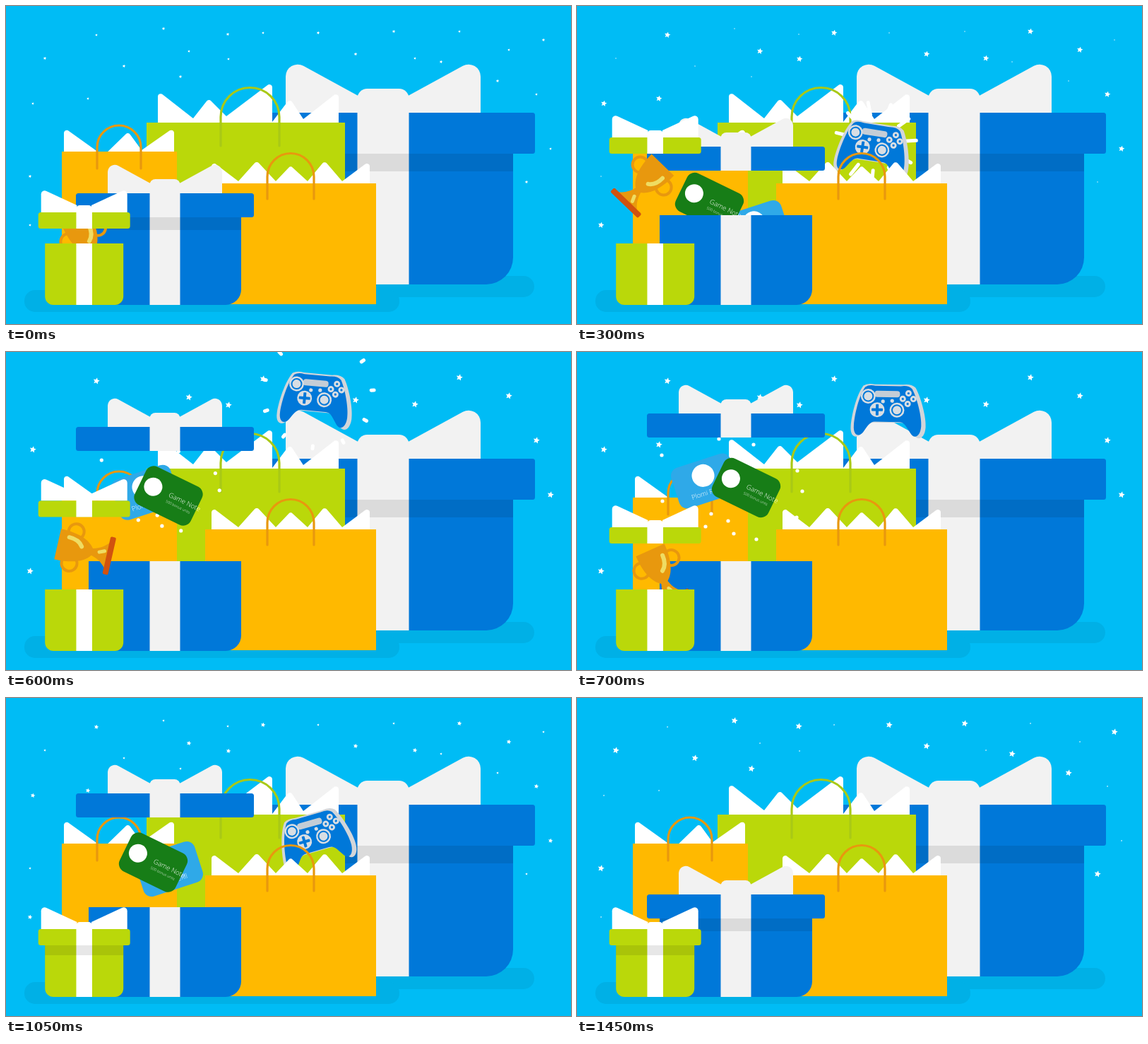
Write an HTML page with a canvas that moves like this. It is 800 px wide and 450 px high and loops after 2950 ms.

```html
<!DOCTYPE html>
<html lang="en">
<head>
<meta charset="utf-8">
<title>Gifts</title>
<style>
html, body { margin: 0; width: 100%; height: 100%; overflow: hidden; background: #00bcf5; }
canvas { display: block; width: 800px; height: 450px; }
</style>
</head>
<body>
<canvas id="stage" width="800" height="450"></canvas>
<script>
const ctx = document.getElementById('stage').getContext('2d');
const LOOP = 2950, END = 1450, STEP = 50;
const SKY = '#00bcf5', BLUE = '#0078d9', LIME = '#bad80a', ORANGE = '#ffb900',
      GOLD = '#e8980e', PAPER = '#f2f2f2', WHITE = '#fff', FONT = '"Open Sans", sans-serif';

// Smooth monotone interpolation through rows of [time, ...values].
function track(rows, t) {
  const last = rows.length - 1;
  if (t <= rows[0][0]) return rows[0].slice(1);
  if (t >= rows[last][0]) return rows[last].slice(1);
  let i = 0;
  while (rows[i + 1][0] <= t) i++;
  const h = rows[i + 1][0] - rows[i][0], u = (t - rows[i][0]) / h;
  return rows[i].slice(1).map((a, k) => {
    const c = k + 1;
    const rate = j => (rows[j + 1][c] - rows[j][c]) / (rows[j + 1][0] - rows[j][0]);
    const slope = j => {
      if (j === 0) return rate(0);
      if (j === last) return rate(last - 1);
      const p = rate(j - 1), q = rate(j);
      return p * q <= 0 ? 0 : 2 * p * q / (p + q);
    };
    const b = rows[i + 1][c], v = 1 - u;
    return a * (1 + 2 * u) * v * v + b * u * u * (3 - 2 * u) +
      h * (slope(i) * u * v * v - slope(i + 1) * u * u * v);
  });
}

const MOTION = {
  lid: [[0, 265], [300, 199], [450, 151], [700, 87], [790, 82], [1050, 135], [1300, 227], [1450, 278]],
  cap: [[0, 292], [300, 186], [400, 172], [450, 174], [700, 248], [870, 327]],
  cup: [[0, 116, 338, -25], [300, 95, 252, 44], [450, 94, 249, 166], [700, 119, 315, 336], [870, 116, 385, 370]],
  pad: [[0, 402, 310, 4], [300, 420, 202, 9], [450, 433, 89, 10], [580, 438, 66, 6], [700, 441, 82, 1],
        [1050, 438, 199, -16], [1300, 437, 265, -24], [1450, 436, 310, -28]],
  green: [[0, 170, 350], [300, 187.5, 278], [450, 208.5, 232.5], [700, 239.5, 192], [750, 241, 190],
          [1050, 208.5, 232.5], [1300, 180, 304], [1450, 170, 350]],
  blue: [[0, 270, 370], [300, 253, 314], [450, 231, 242], [700, 181, 182.5], [750, 179, 180],
         [1050, 231, 242], [1300, 258, 340], [1450, 270, 370]],
  starA: [[0, .4], [300, .92], [450, 1], [700, 1], [1050, .72], [1300, .38], [1450, .25]],
  starB: [[0, .5], [300, .2], [450, 0], [700, 0], [1050, .38], [1300, .8], [1450, 1]]
};

const STARS_A = [[128, 41], [259, 64], [315, 75], [364, 38], [495, 68], [579, 74], [642, 36],
  [712, 62], [751, 125], [771, 202], [116, 131], [38, 138], [34, 310]];
const STARS_B = [[55, 74], [167, 85], [223, 32], [247, 100], [314, 40], [442, 38], [495, 68],
  [549, 36], [616, 79], [696, 106], [761, 48], [737, 249], [34, 241]];
const CONFETTI = [[-95, -44], [35, -59], [97, -22], [104, 7], [96, 44], [39, 75], [7, 67],
  [-33, 57], [-94, 21], [-25, 39], [-1, 49], [-14, -67], [-32, 9]];

const BIG = { x: 534, lidW: 430, lidH: 58, boxW: 368, boxTop: 180, bottom: 394, boxR: 38, rib: 73, bow: 276,
  join: 24, corner: 80, tipR: 17, knot: 34, knotR: 14, shade: 25, fill: BLUE, ribbon: PAPER };
const MID = { x: 225, lidW: 252, lidH: 34, boxW: 216, boxTop: 296, bottom: 423, boxR: 22, rib: 43, bow: 162,
  join: 14, corner: 47, tipR: 10, knot: 20, knotR: 8, shade: 18, fill: BLUE, ribbon: PAPER };
const TINY = { x: 110.7, lidW: 130, lidH: 23, boxW: 111, boxTop: 336, bottom: 423, boxR: 12, rib: 22.5, bow: 122,
  join: 10, corner: 33.5, tipR: 5, knot: 10, knotR: 5, shade: 14, fill: LIME, ribbon: WHITE };

const PAD = new Path2D('M-36-34Q-30-38-20-36L20-36Q32-38 38-32C46-18 54 10 53 24C52 40 42 44 36 34' +
  'C28 22 26 18 18 18L-20 18C-28 18-32 26-38 34C-44 42-54 40-53 24C-52 8-46-20-36-34Z');
const CUP = new Path2D('M-22-38L22-38C22-12 16 4 5 12C8 24 14 30 20 35L-20 35C-14 30-8 24-5 12C-16 4-22-12-22-38Z');

function box(x, y, w, h, r, fill) {
  ctx.fillStyle = fill;
  ctx.beginPath();
  ctx.roundRect(x, y, w, h, r);
  ctx.fill();
}

function disc(x, y, r, fill) {
  ctx.fillStyle = fill;
  ctx.beginPath();
  ctx.arc(x, y, r, 0, Math.PI * 2);
  ctx.fill();
}

function line(x1, y1, x2, y2) {
  ctx.beginPath();
  ctx.moveTo(x1, y1);
  ctx.lineTo(x2, y2);
  ctx.stroke();
}

function pen(color, width) {
  ctx.strokeStyle = color;
  ctx.lineWidth = width;
  ctx.lineCap = 'round';
}

function at(x, y, deg, draw) {
  ctx.save();
  ctx.translate(x, y);
  ctx.rotate(deg * Math.PI / 180);
  draw();
  ctx.restore();
}

function star(x, y, size) {
  if (size < .05) return;
  ctx.fillStyle = WHITE;
  ctx.beginPath();
  for (let i = 0; i < 10; i++) {
    const r = size * (i % 2 ? 2.3 : 4.8), a = i * Math.PI / 5 - 1.35;
    ctx.lineTo(x + r * Math.cos(a), y + r * Math.sin(a));
  }
  ctx.fill();
}

// Points alternate between rounded tips and sharp valleys.
function tissue(points, base) {
  const first = points[0], end = points[points.length - 1];
  ctx.fillStyle = WHITE;
  ctx.beginPath();
  ctx.moveTo(first[0], base);
  points.forEach((p, i) => {
    const next = points[i + 1] || [end[0], base];
    if (i % 2) ctx.lineTo(p[0], p[1]);
    else ctx.arcTo(p[0], p[1], next[0], next[1], 4);
  });
  ctx.lineTo(end[0], base);
  ctx.fill();
}

function bag(x, y, w, bottom, fill, points, handle) {
  tissue(points, y + 1);
  box(x, y, w, bottom - y, 0, fill);
  const [hx, hy, r, foot, color] = handle;
  pen(color, 3.2);
  ctx.beginPath();
  ctx.moveTo(hx - r, foot);
  ctx.arc(hx, hy, r, Math.PI, 0);
  ctx.lineTo(hx + r, foot);
  ctx.stroke();
}

function lobe(g, y, side) {
  const outer = g.x + side * g.bow / 2, inner = g.x + side * (g.rib / 2 - 1);
  ctx.fillStyle = g.ribbon;
  ctx.beginPath();
  ctx.moveTo(outer, y);
  ctx.arcTo(outer, y - g.corner, inner, y - g.join, g.tipR);
  ctx.lineTo(inner, y - g.join);
  ctx.lineTo(inner, y);
  ctx.fill();
}

function gift(g, y) {
  const left = g.x - g.boxW / 2, rib = g.x - g.rib / 2, under = y + g.lidH;
  box(left, g.boxTop, g.boxW, g.bottom - g.boxTop, [0, 0, g.boxR, g.boxR], g.fill);
  box(rib, g.boxTop, g.rib, g.bottom - g.boxTop, 0, g.ribbon);
  const top = Math.max(under, g.boxTop);
  if (under + g.shade > top) box(left, top, g.boxW, under + g.shade - top, 0, 'rgba(0,0,0,.095)');
  lobe(g, y, -1);
  lobe(g, y, 1);
  box(g.x - g.lidW / 2, y, g.lidW, g.lidH, 3.5, g.fill);
  box(rib, y - g.knot, g.rib, g.knot + g.lidH, [g.knotR, g.knotR, 0, 0], g.ribbon);
}

function rays(x, y, count, start, inner, outer, width) {
  if (outer <= inner) return;
  pen(WHITE, width);
  for (let i = 0; i < count; i++) {
    const a = start + i * Math.PI * 2 / count, c = Math.cos(a), s = Math.sin(a);
    line(x + c * inner, y + s * inner, x + c * outer, y + s * outer);
  }
}

function ring(x, y) {
  disc(x, y, 10.5, '#d9dee3');
  disc(x, y, 8, BLUE);
  disc(x, y, 6, '#d9dee3');
}

function controller() {
  ctx.fillStyle = '#d2d5d9';
  ctx.fill(PAD);
  ctx.save();
  ctx.translate(-1, 0);
  ctx.scale(.9, .94);
  ctx.fillStyle = BLUE;
  ctx.fill(PAD);
  ctx.restore();
  box(-20, -27, 36, 9, 4, '#c4cdd6');
  ring(-29, -19);
  ring(12, 0);
  disc(-16, 0, 10.5, '#d9dee3');
  box(-24, -2, 16, 4, 1, BLUE);
  box(-18, -8, 4, 16, 1, BLUE);
  [[28, -24], [20, -16], [35, -16], [27, -9]].forEach(([x, y]) => {
    disc(x, y, 4.5, '#d9dee3');
    disc(x, y, 1.6, BLUE);
  });
  disc(-8, -12, 2.6, '#d9dee3');
  disc(5, -13, 2.6, '#d9dee3');
}

function trophy() {
  pen(GOLD, 4);
  for (const x of [-23, 23]) {
    ctx.beginPath();
    ctx.arc(x, -16, 11, 0, Math.PI * 2);
    ctx.stroke();
  }
  ctx.fillStyle = GOLD;
  ctx.fill(CUP);
  box(-27, 33, 54, 8, 2, '#d1520f');
  pen('#efdc62', 6);
  ctx.beginPath();
  ctx.moveTo(4, -4);
  ctx.quadraticCurveTo(13, -10, 13, -24);
  ctx.stroke();
  pen('#efdc62', 5);
  line(2, 22, 5, 29);
}

function label(text, x, y, size) {
  ctx.font = `300 ${size}px ${FONT}`;
  ctx.fillStyle = WHITE;
  ctx.fillText(text, x, y);
}

function greenCard() {
  box(-44, -30, 88, 60, 12, '#177d17');
  disc(-25, -2, 13, WHITE);
  label('Game Note', 0, 1, 9.5);
  label('500 bonus units', 0, 10, 5.2);
}

function blueCard() {
  box(-44, -30, 88, 60, 12, '#2fa9e8');
  disc(0, -8, 16, WHITE);
  label('Plomi Refill', -25, 20, 9.5);
}

function render(t) {
  const now = {};
  for (const key in MOTION) now[key] = track(MOTION[key], t);

  box(0, 0, 800, 450, 0, SKY);
  box(520, 382, 228, 30, 15, '#00b0e6');
  box(26, 402, 531, 31, 15, '#00b0e6');
  STARS_A.forEach(([x, y]) => star(x, y, now.starA[0]));
  STARS_B.forEach(([x, y]) => star(x, y, now.starB[0]));

  gift(BIG, 151);
  bag(199, 165, 281, 400, LIME,
    [[215, 120], [265, 159], [287, 131], [312, 156], [377, 107], [377, 164], [402, 131], [421, 160], [471, 121]],
    [345.5, 157, 41.5, 198, '#a9c916']);
  bag(79, 206, 163, 403, ORANGE,
    [[82, 172], [138, 212], [173, 178], [192, 204], [238, 172]],
    [160, 200, 31, 230, GOLD]);

  const [px, py, pr] = now.pad;
  if (t >= 200 && t < 620) {
    const p = (t - 200) / 420;
    rays(px + 3, py - 9, 11, -1.76, 28 + 50 * p, 50 + 31 * p, 5);
  }
  at(px, py, pr, controller);
  bag(282, 251, 242, 422, ORANGE,
    [[291, 219], [329, 248], [355, 219], [382, 248], [403, 226], [427, 248], [451, 219], [476, 248], [515, 219]],
    [403, 241.5, 33, 273, GOLD]);

  if (t >= 500 && t <= 850) {
    const p = (t - 500) / 200, spread = .45 + .55 * Math.sin(Math.min(p, 1.3) * Math.PI / 2);
    const r = 2.6 * Math.min(1, (900 - t) / 200);
    CONFETTI.forEach(([x, y]) => disc(215 + x * spread, 190 + y * spread, r, WHITE));
  }
  at(...now.blue, -18, blueCard);
  if (t >= 350 && t < 600) {
    const p = (t - 350) / 250;
    rays(224, 238, 22, .05, 15 + 52 * p, 44 + 26 * p, 3.2);
  }
  at(...now.green, 26, greenCard);
  gift(MID, now.lid[0]);

  if (t < 870) at(...now.cup, trophy);
  gift(TINY, now.cap[0]);
}

function tick(ms) {
  const t = Math.min(ms % LOOP, END);
  render(Math.floor(t / STEP) * STEP);
  requestAnimationFrame(tick);
}

const begin = performance.now();
const loop = () => tick(Math.max(0, performance.now() - begin));
(function play() {
  const t = Math.min((performance.now() - begin) % LOOP, END);
  render(Math.floor(t / STEP) * STEP);
  requestAnimationFrame(play);
})();
</script>
</body>
</html>
```
